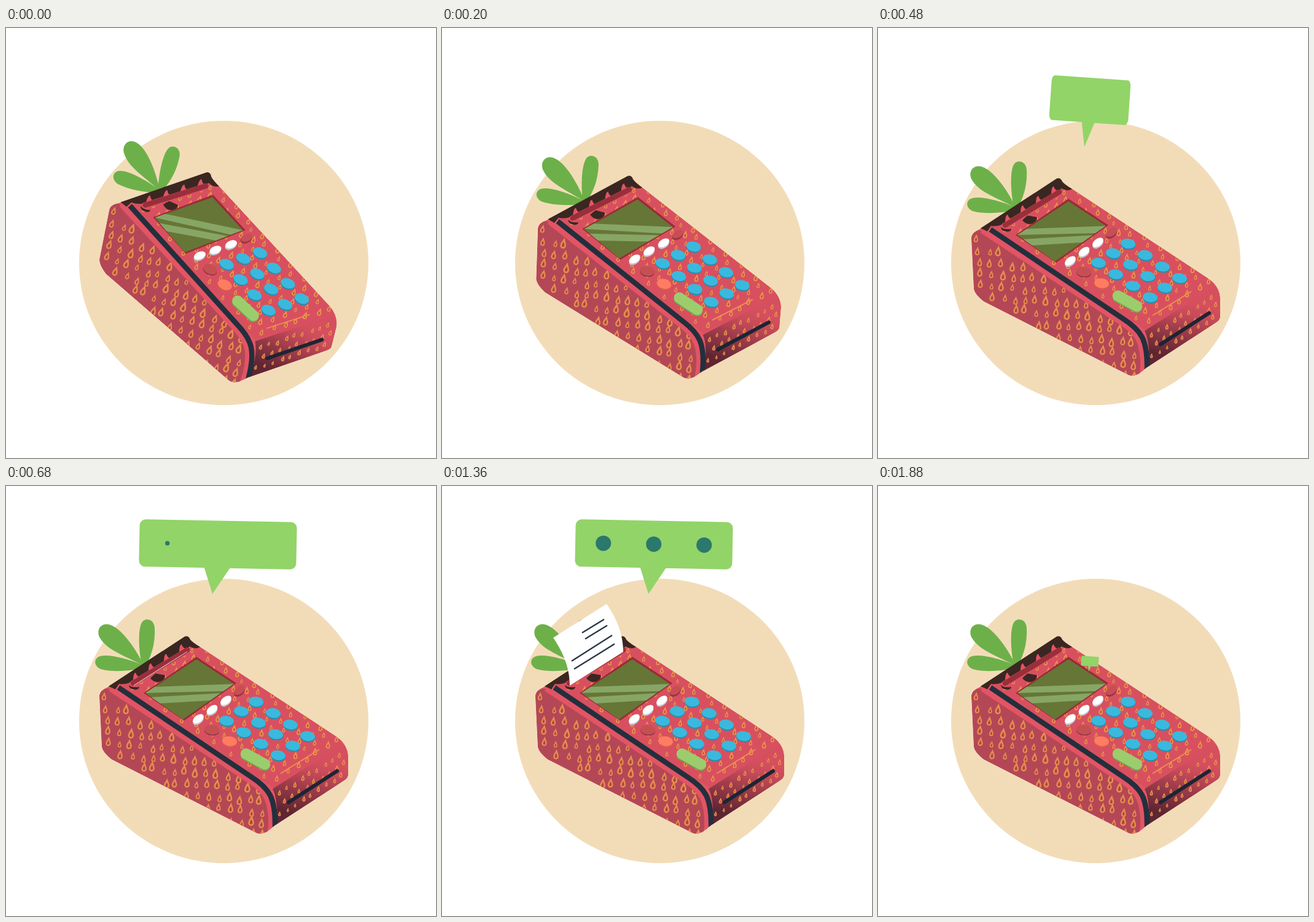
Write an HTML page that moves like this. It is 700 px wide and 700 px high and loops after 1.92 s.

```html
<!DOCTYPE html>
<html lang="en">
<head>
<meta charset="utf-8">
<title>Strawberry card terminal</title>
<style>
html, body { margin: 0; width: 100%; height: 100%; overflow: hidden; background: #fff; }
svg { display: block; width: 100vw; height: 100vh; }
</style>
</head>
<body>
<svg viewBox="0 0 700 700">
  <defs>
    <linearGradient id="frontShade" gradientUnits="userSpaceOnUse" x1="500" y1="445" x2="480" y2="535">
      <stop offset="0" stop-color="#d64f5e"/>
      <stop offset=".2" stop-color="#c84b5a"/>
      <stop offset="1" stop-color="#5e2532"/>
    </linearGradient>
    <path id="seed" d="M0-6.5C1.6-2.5 3.4-.5 3.4 2.6A3.4 3.6 0 0 1-3.4 2.6C-3.4-.5-1.6-2.5 0-6.5Z"/>
    <path id="outline" d="M152 341Q153 333 166 327L293 246L316 262L538 408Q556 420 557 440V470Q557 475 551 479L437 553L425 563Q415 568 408 565L172 445Q158 434 156 425Z"/>
    <path id="sideFace" d="M152 343C152 331 164 326 174 333L398 483C424 501 431 517 426 562Q415 568 408 565L172 445Q158 434 156 425Z"/>
    <clipPath id="bodyClip"><use href="#outline"/></clipPath>
    <clipPath id="sideClip"><use href="#sideFace"/></clipPath>
    <clipPath id="paperClip"><path class="paper"/></clipPath>
    <clipPath id="screenClip"><path d="M310 282L371 322L288 380L227 337Z"/></clipPath>
  </defs>

  <ellipse cx="354.5" cy="382.5" rx="235.5" ry="231.5" fill="#f2dcb8"/>

  <g id="device">
    <g fill="#6db049">
      <path d="M223 290C213 268 186 226 164 225C150 225 147 240 154 249C166 268 195 277 223 292Z"/>
      <path d="M221 292C215 262 215 230 222 221C228 214 241 217 242 231C243 255 238 272 229 290Z"/>
      <path d="M222 291C195 280 160 271 149 279C142 285 145 294 154 298C172 303 200 302 222 296Z"/>
    </g>

    <g clip-path="url(#bodyClip)">
      <use href="#outline" fill="#e35464"/>
      <use href="#sideFace" fill="#b44756"/>
      <g id="sideSeeds" clip-path="url(#sideClip)" fill="#a9483f" stroke="#e78d50" stroke-width="2.6"/>
      <path fill="none" stroke="#e35464" stroke-width="8" d="M169 330L399 482C422 497 433 512 431 560"/>
      <path fill="#d8505f" d="M182 324L293 249L316 262L538 408Q546 414 549 420L436 493Q429 485 400 471Z"/>
      <path fill="url(#frontShade)" d="M434 493L549 420Q557 430 557 440V470Q557 475 551 479L441 552Q443 510 434 493Z"/>
      <g id="topSeeds" fill="#c4553f" stroke="#eb9350" stroke-width="2.6"/>
      <path fill="none" stroke="#242f3d" stroke-width="8.5" d="M183 328L400 474C428 492 439 507 438 555"/>
    </g>

    <path fill="#3a2721" d="M167 326L291 245Q297 243 300 250Q306 257 316 262Q307 267 299 261L295 264L206 318Q194 324 184 322L178 331Z"/>
    <path fill="#3a2721" d="M200 324Q207 329 217 327Q216 333 207 331Q201 330 200 324ZM235 313L243 305L259 308Q258 319 248 319Q241 320 235 313Z"/>
    <path stroke="#df5263" stroke-width="10" stroke-linecap="round" d="M206 322L295 268"/>
    <path id="drips" fill="#e35464"/>
    <path stroke="#992f3b" stroke-width="8.5" stroke-linecap="round" d="M207 321L295 267"/>

    <path fill="#982b37" d="M310 278L375 321L290 382L224 337Z"/>
    <path fill="#667636" d="M310 282L371 322L288 380L227 337Z"/>
    <path clip-path="url(#screenClip)" fill="#87a666" d="M241 327L375 322L355 334L222 337ZM234 344L354 337L334 349L249 354Z"/>

    <g id="buttons"/>
    <path stroke="#ee914f" stroke-width="1.8" d="M447 468L510 429"/>
    <path stroke="#1c2533" stroke-width="6" stroke-linecap="round" d="M460 515L539 464"/>

    <path class="paper" fill="#fff"/>
    <path clip-path="url(#paperClip)" stroke="#28344a" stroke-width="2.3" d="M211 285L277 243M215 298L281 257M228 239L264 217M233 249L269 227"/>
  </g>

  <g id="bubble" fill="#92d468">
    <rect x="-128" y="-38.5" width="256" height="77" rx="10"/>
    <path d="M-22 37H21L-7.4 81Z"/>
  </g>
  <g id="dots" fill="#2b786c"/>
</svg>

<script>
const LOOP = 1920, FRAME = 40;
const $ = id => document.getElementById(id);
const clamp = v => Math.max(0, Math.min(1, v));
const ramp = (t, from, to) => clamp((t - from) / (to - from));
const smooth = u => (1 - Math.cos(Math.PI * u)) / 2;

let randomState = 11;
const random = () => (randomState = randomState * 16807 % 2147483647) / 2147483647;

function add(parent, tag, attrs) {
  const node = document.createElementNS('http://www.w3.org/2000/svg', tag);
  for (const key in attrs) node.setAttribute(key, attrs[key]);
  return parent.appendChild(node);
}

// Staggered, jittered seeds on a grid spanned by two edge vectors
function seedGrid(parent, origin, along, across, rows, cols, scale) {
  for (let r = 0; r < rows; r++) for (let c = 0; c < cols; c++) {
    const u = (r + 0.35 + 0.3 * random()) / rows;
    const v = (c + 0.1 + 0.5 * (r % 2) + 0.3 * random()) / cols;
    const x = origin[0] + along[0] * u + across[0] * v;
    const y = origin[1] + along[1] * u + across[1] * v;
    const size = scale * (0.75 + 0.5 * random());
    add(parent, 'use', { href: '#seed', transform: `translate(${x} ${y}) rotate(6) scale(${size})` });
  }
}
seedGrid($('sideSeeds'), [153, 335], [268, 160], [8, 92], 15, 5, 0.85);
seedGrid($('topSeeds'), [197, 326], [240, 161], [112, -73], 18, 7, 0.6);
seedGrid($('topSeeds'), [441, 494], [3, 51], [112, -71], 3, 9, 0.5);

// Flame-shaped gaps in the chocolate edge
let drips = '';
for (let i = 0; i < 4; i++)
  drips += `M${207 + 25 * i} ${318 - 15.3 * i}q0-14 4-14q3 8 9 7Z`;
$('drips').setAttribute('d', drips);

function button(x, y, fill, shade, rx = 12, ry = 8, tilt = 8, depth = 2) {
  for (const [dy, color] of [[depth, shade], [0, fill]])
    add($('buttons'), 'ellipse', { rx, ry, fill: color, transform: `translate(${x} ${y + dy - 0.5}) rotate(${tilt})` });
}
for (let i = 0; i < 3; i++) button(313 + 22.5 * i, 379.5 - 15 * i, '#fff', '#c3c9d8', 10, 6, -36, 2.5);
button(335, 397, '#c55054', '#983643');
button(380, 333, '#c94d57', '#983643', 10, 6, -35, 3);
for (let row = 0; row < 3; row++)
  for (let col = 0; col < 4; col++)
    button(407 - 24 * row + 28 * col, 351.5 + 15.6 * row + 18.7 * col, '#39b9dd', '#238dad');
button(364, 416, '#ff7c60', '#d35a4b');
for (const [dy, stroke] of [[2, '#73a24d'], [0, '#9ccd6d']])
  add($('buttons'), 'path', { d: `M390.5 ${436 + dy}L421.5 ${453 + dy}`, stroke, 'stroke-width': 17.5, 'stroke-linecap': 'round' });

const dots = [0, 1, 2].map(i => add($('dots'), 'circle', { cx: 262.7 + 82 * i, cy: 93.2 + 1.5 * i }));
const papers = document.querySelectorAll('.paper');

// Linear rocking between +14 and -14 degrees, settling at zero
function rockAngle(t) {
  if (t >= 360) return -14 * (1 - ramp(t, 360, 420));
  return 14 * (Math.abs((t % 240) / 120 - 1) * 2 - 1);
}

function paperPath(h) {
  const edge = 27 * h * h;
  return `M208 325Q208 ${325 - 39 * h} ${208 - edge} ${325 - 78 * h}` +
    `L${295 - edge} ${270 - 78 * h}Q295 ${270 - 39 * h} 295 270Z`;
}

function bubbleTransform(grow) {
  const y = 95 + 238 * (1 - Math.min(1, 1.8 * grow));
  const tilt = 1.1 + 2.9 * Math.min(1, 2 * (1 - grow));
  return `translate(345 ${y}) rotate(${tilt}) scale(${grow} ${Math.min(1, 1.88 * grow)})`;
}

function draw(t) {
  $('device').setAttribute('transform', `rotate(${rockAngle(t)} 350 385)`);

  const height = smooth(ramp(t, 640, 1240)) * (1 - smooth(ramp(t, 1620, 1750)));
  papers.forEach(p => p.setAttribute('d', paperPath(height)));
  papers.forEach(p => p.setAttribute('visibility', height > 0 ? 'visible' : 'hidden'));

  const grow = (1 - (1 - ramp(t, 413, 640)) ** 2) * (1 - ramp(t, 1720, 1900));
  $('bubble').setAttribute('transform', bubbleTransform(grow));
  $('bubble').setAttribute('visibility', grow > 0 ? 'visible' : 'hidden');

  dots.forEach((dot, i) => {
    const shown = smooth(ramp(t, 640 + 200 * i, 750 + 200 * i));
    const gone = smooth(ramp(t, 1600 - 80 * i, 1700 - 80 * i));
    dot.setAttribute('r', 12.5 * shown * (1 - gone));
  });
}

// Poses hold for one frame at 25 fps; the small offset absorbs timer jitter
const start = performance.now();
function tick(now) {
  const elapsed = Math.max(0, now - start) + 8;
  draw(Math.floor(elapsed / FRAME) * FRAME % LOOP);
  requestAnimationFrame(tick);
}
draw(0);
requestAnimationFrame(tick);
</script>
</body>
</html>
```
